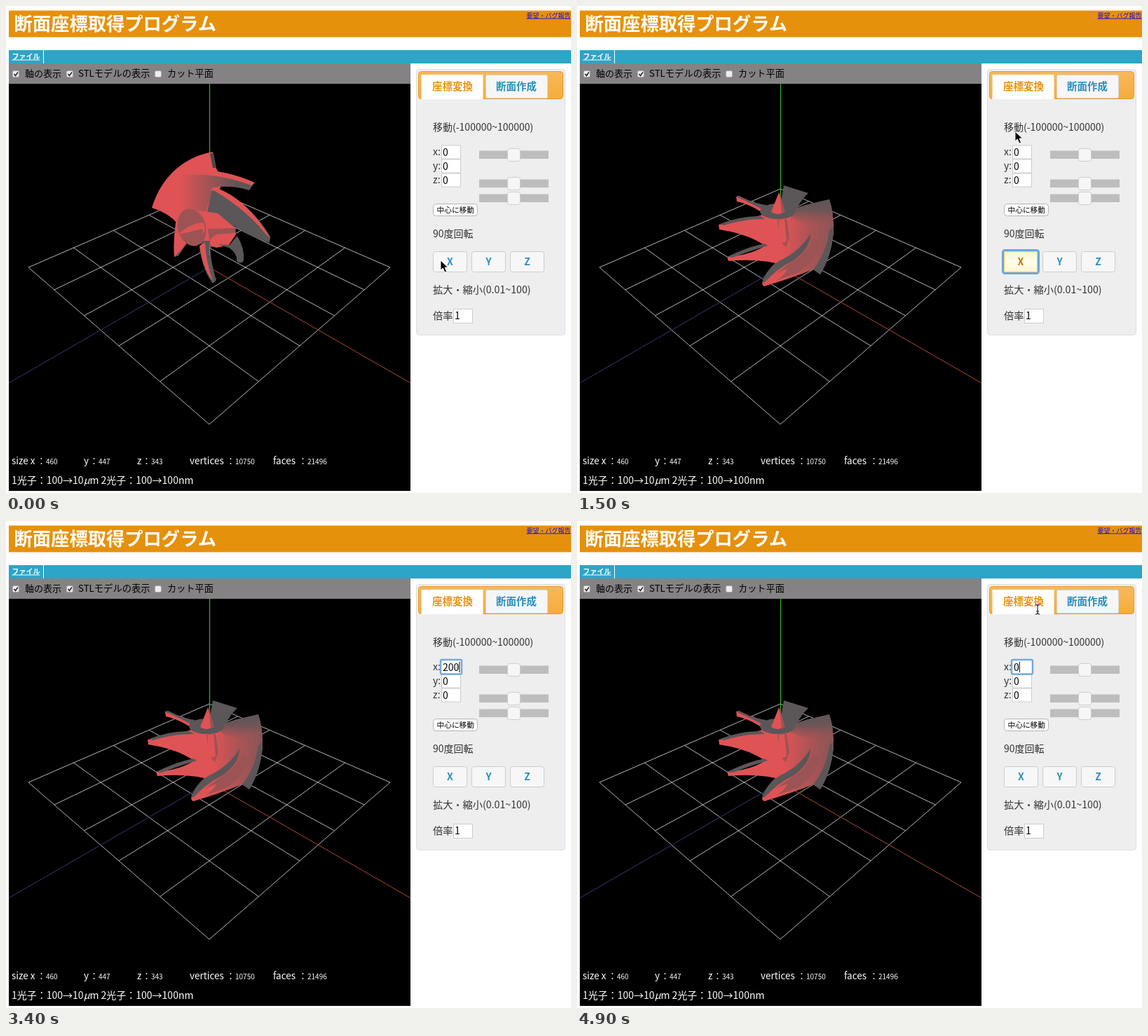
Recreate the animation shown at these times as an HTML page. Size 806x695 px, loop 5000 ms.

```html
<!DOCTYPE html>
<html lang="ja">
<head>
<meta charset="utf-8">
<style>
html, body { margin: 0; width: 100%; height: 100%; overflow: hidden; background: #fff; }
svg { display: block; width: 806px; height: 695px; }
text { font-family: "Noto Sans CJK JP", "Noto Sans CJK", sans-serif; font-weight: 500; white-space: pre; }
.red { fill: #df5355; } .mid { fill: #9c5354; } .gray { fill: #5b5658; } .dark { fill: #49474a; }
</style>
</head>
<body>
<svg viewBox="0 0 806 695">
  <defs>
    <linearGradient id="fade"><stop offset=".1" stop-color="#df5355"/><stop offset=".5" stop-color="#965455"/><stop offset=".8" stop-color="#5b5658"/></linearGradient>
    <linearGradient id="shade"><stop offset=".3" stop-color="#df5355"/><stop offset=".65" stop-color="#ad5455"/><stop offset="1" stop-color="#8a5556"/></linearGradient>
    <linearGradient id="dusk" x2="0" y2="1"><stop stop-color="#5b5658"/><stop offset=".4" stop-color="#6d5557"/><stop offset="1" stop-color="#9c5354" stop-opacity="0"/></linearGradient>
    <linearGradient id="tabs" x2="0" y2="1"><stop stop-color="#f8b95a"/><stop offset="1" stop-color="#f5ac3c"/></linearGradient>
    <linearGradient id="warm" x2="0" y2="1"><stop stop-color="#fdf3cd"/><stop offset=".5" stop-color="#fffdf0"/><stop offset="1" stop-color="#fdf3cd"/></linearGradient>
    <clipPath id="view"><rect x="4" y="111" width="573" height="581"/></clipPath>
  </defs>

  <g id="page"></g>

  <g clip-path="url(#view)">
    <rect x="4" y="111" width="573" height="581"/>
    <path id="grid" fill="none" stroke="#b4b4b4"/>
    <path d="M290 373L577 538" stroke="#a8483f"/>
    <path d="M290 373L4 538" stroke="#37376e"/>
    <path d="M290.500 111V373" stroke="#35ad1c" stroke-width="1.300"/>

    <g id="front">
      <path class="red" d="M208 288Q217 259 235 240Q260 214 295 208L299 230L310 250L288 300L246 312Q232 295 208 288Z"/>
      <path class="dark" d="M291 211L296 209L300 231L295 231Z"/>
      <path fill="url(#fade)" d="M238 241Q292 232 354 253L347 263Q322 255 297 259L285 293L250 292Q233 270 238 241Z"/>
      <path class="red" d="M235 240Q292 224 355 252L350 256Q292 234 237 243Z"/>
      <path class="gray" d="M294 262Q345 275 377 329L376 338Q345 328 327 315L286 299Z"/>
      <path class="red" d="M296 258Q344 274 378 333L370 325Q344 292 298 264L292 263Z"/>
      <path class="red" d="M276 292L302 296L326 316L328 326L318 341L300 345L280 338Z"/>
      <path class="gray" d="M302 340L319 341L330 328Q341 347 339 364Q334 369 329 364Q331 354 318 345Z"/>
      <path class="mid" d="M288 318L328 317L327 324L300 326L290 334Z"/>
      <path class="gray" d="M281 335L291 335Q291 365 300 391L295 396Q281 378 276 345Z"/>
      <path class="red" d="M276 342L284 338Q285 365 295 392Q281 376 276 342Z"/>
      <path class="red" d="M243 302L255 302L259 337L246 356L240 358Q238 337 243 302Z"/>
      <path class="gray" d="M240 358L249 349L260 335L246 356Z"/>
      <ellipse class="mid" cx="265" cy="316" rx="20" ry="27" transform="rotate(-16 265 316)"/>
      <path class="red" d="M246 326Q262 310 281 309Q287 319 280 326Q263 329 246 326Z"/>
      <path class="mid" d="M246 326L281 318L280 326Q263 330 246 326Z"/>
      <path d="M290.500 341V356" stroke="#35ad1c"/>
    </g>

    <g id="back">
      <path class="gray" d="M223 240Q285 209 349 239L332 270Q362 292 373 322L368 326L330 318Q352 350 350 372L341 376Q335 350 310 334L291 332Q296 365 306 386L300 391Q284 370 279 345Q268 348 262 344Q258 360 252 376L246 374Q242 350 245 322L215 304Q220 280 234 264Z"/>
      <path class="mid" d="M347 241L332 269L315 262Q334 256 347 241Z"/>
      <path class="red" d="M347 241L332 269L326 266Z"/>
      <path class="mid" d="M290 274Q327 279 355 304L370 322Q330 309 272 298Q288 291 290 274Z"/>
      <path class="red" d="M304 281Q340 294 370 323Q330 302 272 298Q306 294 304 281Z"/>
      <path class="red" d="M288 324Q310 314 333 313L327 322L303 328Z"/>
      <path class="mid" d="M300 327L321 327Q342 350 345 372L337 371Q332 346 300 327Z"/>
      <path class="red" d="M319 328Q338 346 345 370L339 372Q339 351 319 328ZM281 344L288 340Q291 369 302 388Q288 372 281 344ZM246 331L268 329L254 344L247 373Q254 340 246 331Z"/>
      <path d="M290.500 224V257" stroke="#35ad1c" stroke-width="1.300"/>
    </g>

    <g id="upright">
      <path class="gray" d="M295 256L330 267Q320 276 314 289L303 300L290 284Z"/>
      <path class="red" d="M227 272L231 271L266 287L264 295Q247 283 228 279Z"/>
      <path class="gray" d="M227 272L231 271Q250 281 270 284L264 290Q248 281 227 272Z"/>
      <path class="red" d="M202 312Q240 306 264 298L304 302L304 350L285 358Q262 328 203 319Z"/>
      <path class="gray" d="M204 311Q232 300 262 300L268 304Q238 304 210 313Z"/>
      <path class="red" d="M214 358Q250 355 270 341L300 340L289 368Q252 360 216 364Z"/>
      <path class="gray" d="M214 358Q245 343 268 339L272 342Q246 350 222 359Z"/>
      <path fill="url(#shade)" d="M302 301L314 288L330 283L360 276Q367 298 366 325Q362 358 347 383L337 376Q304 389 267 400L264 396Q270 378 284 366L296 340Z"/>
      <path fill="url(#dusk)" d="M303 300L314 288L330 283L360 276Q366 295 366 315L344 312L316 307Z"/>
      <path class="gray" d="M366 315Q365 355 347 383L337 376Q356 352 360 320Z"/>
      <path class="gray" d="M264 394Q271 374 290 363Q318 350 333 325Q333 346 309 363Q283 376 268 395Z"/>
      <path class="mid" d="M268 398Q288 376 312 362Q330 350 337 331L346 340Q340 364 316 380Z"/>
      <path class="red" d="M264 397Q280 382 300 375Q294 390 267 400Z"/>
      <ellipse class="gray" cx="286" cy="293" rx="25" ry="11"/>
      <path class="mid" d="M286 305L299 303L303 330L298 344L290 336Z"/>
      <path class="red" d="M288 305L296 304L299 336L288 340Z"/>
      <path class="red" d="M288 266L296 294Q286 300 277 294Z"/>
      <path class="mid" d="M289 266L297 294L292 296Z"/>
    </g>
  </g>

  <g id="stats"></g>

  <g id="pressed">
    <rect x="607.500" y="348.500" width="51" height="33" rx="3" fill="url(#warm)" stroke="#6aa7df" stroke-width="3"/>
    <rect x="609.500" y="350.500" width="47" height="29" rx="2" fill="none" stroke="#f6cf57"/>
    <text x="633" y="370" text-anchor="middle" font-size="14" style="font-weight:700" fill="#c77405">X</text>
  </g>
  <rect id="focus" x="620" y="198" width="30" height="20.500" rx="2" fill="#fff" stroke="#72aae0" stroke-width="2.500"/>
  <text id="value" x="623" y="213.500" font-size="14"></text>
  <path id="caret" stroke="#000"/>

  <circle id="ring" cx="636" cy="364" r="8.500" fill="#fff" stroke="#c08f74" stroke-width="6"/>
  <g id="cursor">
    <path id="arrow" d="M0 0V14L3.300 11L6 17L8.500 16L6 10H10.500Z" stroke="#fff" stroke-width=".9"/>
    <path id="hand" d="M-1 1Q1-2 3 1V6Q6 4 7 6Q10 5 10 8Q12 8 11 11L9 17H2L-4 10Q-3 7 0 10Z" fill="#fff" stroke="#000" stroke-width="1.300"/>
    <path id="beam" d="M-3-7Q0-7 0-5Q0-7 3-7M0-5V6M-2 3H2M-3 7Q0 7 0 5Q0 7 3 7" fill="none" stroke="#222" stroke-width="1.200"/>
  </g>
</svg>

<script>
const $ = id => document.getElementById(id);
const rect = (x, y, w, h, fill, more = '') =>
  `<rect x="${x}" y="${y}" width="${w}" height="${h}" fill="${fill}" ${more}/>`;
const text = (x, y, size, str, fill = '#000', more = '') =>
  `<text x="${x}" y="${y}" font-size="${size}" fill="${fill}" ${more}>${str}</text>`;
const box = (x, y, w, h, fill, line, r = 0) =>
  rect(x + .5, y + .5, w - 1, h - 1, fill, `stroke="${line}" rx="${r}"`);
const bold = 'style="font-weight:700"', under = 'text-decoration="underline"';
const blue = '#2a8fbd', ink = '#333';

const checkbox = (x, on) => box(x, 92, 10, 10, '#eee', '#aaa', 2) +
  (on ? `<path d="M${x + 2.5} 97l2 2.500l3.500-5" fill="none" stroke="#222" stroke-width="1.600"/>` : '');
const field = (x, y, w, h, str) => box(x, y, w, h, '#fff', '#ccc') + text(x + 2, y + 15, 14, str);
const slider = y => rect(675, y - 5.5, 99, 11.5, '#bdbdbd') + box(715, y - 9, 19, 19, '#f6f6f6', '#ccc', 3);
const button = (x, name) => box(x, 350, 49, 30, '#f7f7f7', '#ccc', 3) +
  text(x + 24.5, 370, 14, name, blue, bold + ' text-anchor="middle"');

$('page').innerHTML =
  rect(4, 6.5, 802, 38, '#e6910c') +
  text(11.5, 34.7, 26.3, '断面座標取得プログラム', '#fff', bold) +
  text(742.5, 16.5, 9, '要望・バグ報告', '#1a0dd8', under) +
  rect(4, 63, 802, 19, '#2ca5c7') +
  text(8.5, 75.5, 10, 'ファイル', '#fff', bold + ' ' + under) +
  rect(53, 63, 1, 19, '#fff') +
  rect(4, 82, 573, 29, '#848284') +
  checkbox(9, 1) + text(27, 101, 13, '軸の表示') +
  checkbox(86, 1) + text(103, 101, 13.3, 'STLモデルの表示') +
  checkbox(212, 0) + text(230, 101, 13.2, 'カット平面') +
  box(585, 90, 213, 380, '#eee', '#ddd', 4) +
  box(588, 93, 207, 40, 'url(#tabs)', '#e79a25', 4) +
  rect(592.5, 98, 88, 35, '#fff') + text(608, 120, 14.5, '座標変換', '#e8930f', bold) +
  box(684, 98, 89, 34, '#f6f6f6', '#d5d5d5', 2) + text(699, 120, 14.5, '断面作成', blue, bold) +
  text(609, 178, 14, '移動(-100000~100000)', ink) +
  ['x', 'y', 'z'].map((c, i) =>
    text(609, 213 + 20 * i, 14, c + ':', ink) + field(621, 198.5 + 20 * i, 28, 20, i ? '0' : '')).join('') +
  [212, 253, 274].map(slider).join('') +
  box(609, 282, 64, 18, '#fff', '#b5b5b5', 4) + text(614.5, 295, 10.7, '中心に移動') +
  text(609, 330, 14, '90度回転', ink) +
  button(609, 'X') + button(664, 'Y') + button(719, 'Z') +
  text(609, 410, 14.2, '拡大・縮小(0.01~100)', ink) +
  text(609, 447, 14.2, '倍率', ink) + field(638, 432, 28, 21, '1');

const stats = [[8, 'size x', 57, 460], [111, 'y', 132, 447], [187, 'z', 207, 343],
  [262, 'vertices', 327, 10750], [381, 'faces', 430, 21496]];
$('stats').innerHTML = stats.map(([x, name, vx, n]) =>
  text(x, 654, 13.5, name, '#fff') + text(vx - 13, 654, 13, '：', '#fff') + text(vx, 654, 10, n, '#fff')).join('') +
  text(8, 682, 14, '1光子：100→10<tspan font-style="italic">μ</tspan>m 2光子：100→100nm', '#fff');

// Ground plane in perspective, five cells a side
const ground = (u, v) => {
  const s = u + v, w = 1 + .1 * s;
  return `${290 + 77.4 * (u - v) / w} ${(597 - 7.5 * s) / w}`;
};
let lines = '';
for (let i = 0; i <= 5; i++)
  lines += `M${ground(i, 0)}L${ground(i, 5)}M${ground(0, i)}L${ground(5, i)}`;
$('grid').setAttribute('d', lines);

const path = [[0, 620, 363], [200, 636, 365], [1000, 636, 365], [1400, 625, 179], [1700, 625, 179],
  [2000, 641, 207], [4400, 641, 207], [4800, 657, 126], [5000, 657, 126]];
const typed = [[0, '0'], [2600, '2'], [2800, '20'], [3200, '200'], [4300, '0']];

function pointer(t) {
  const i = path.findIndex(p => p[0] > t), [t0, x0, y0] = path[i - 1], [t1, x1, y1] = path[i];
  const k = (t - t0) / (t1 - t0), e = k * k * (3 - 2 * k);
  return [x0 + (x1 - x0) * e, y0 + (y1 - y0) * e];
}
const show = (id, on) => $(id).setAttribute('visibility', on ? 'visible' : 'hidden');

function draw() {
  const t = Math.floor(performance.now() % 5000 / 100) * 100;
  show('front', t < 500);
  show('back', t >= 500 && t < 1000);
  show('upright', t >= 1000);
  const moved = t >= 3500 && t < 4600;
  $('upright').setAttribute('transform', moved ? 'matrix(1.09 0 0 1.1 33 -3)' : '');

  show('pressed', t >= 400 && t < 2300);
  show('ring', (t >= 400 && t < 600) || (t >= 700 && t < 1000));
  const str = typed.filter(k => k[0] <= t).pop()[1];
  $('value').textContent = str;
  show('focus', t >= 2300);
  show('caret', t >= 2300);
  $('caret').setAttribute('d', `M${623.5 + 7.8 * str.length} 201V216`);

  show('arrow', t < 200 || (t >= 1100 && t < 1900));
  show('hand', t >= 200 && t < 1100);
  show('beam', t >= 1900 && (t < 2600 || t >= 3600));
  $('cursor').setAttribute('transform', `translate(${pointer(t)})`);
  requestAnimationFrame(draw);
}
draw();
</script>
</body>
</html>
```
